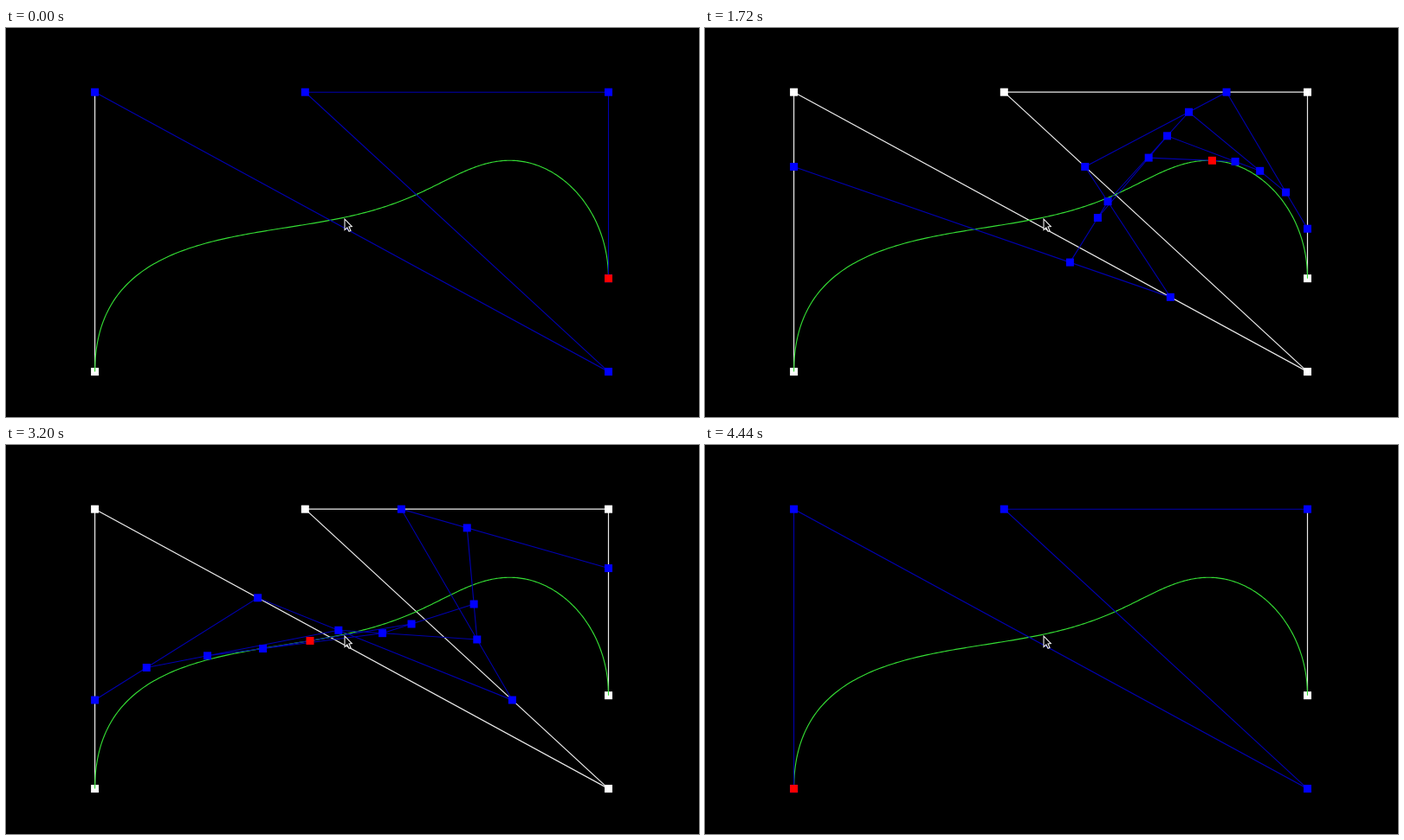
These frames come from a looping animation (800 px wide and 450 px high, 4.48 s). An HTML page with a canvas:

```html
<!DOCTYPE html>
<html lang="en">
<head>
<meta charset="utf-8">
<title>Bezier curve construction</title>
<style>
html, body { margin: 0; width: 100%; height: 100%; overflow: hidden; background: #000; }
canvas { display: block; }
</style>
</head>
<body>
<canvas id="stage" width="800" height="450"></canvas>
<script>
const ctx = document.getElementById('stage').getContext('2d');
const LOOP = 4480, STEP = 40;

const left = 102.6, right = 695.5, top_ = 74.2, bottom = 397.6;
const control = [
  [right, 289.7], [right, top_], [345.3, top_],
  [right, bottom], [left, top_], [left, bottom]
];

// Rest, then steady travel that speeds up slightly on the way, then rest
function paramAt(ms) {
  const since = t => Math.max(0, ms - t) / 1000;
  return Math.min(1, 0.2636 * since(708) + 0.024 * since(2120));
}

// One de Casteljau step
function reduce(pts, u) {
  return pts.slice(1).map(([x, y], i) => [
    pts[i][0] + (x - pts[i][0]) * u,
    pts[i][1] + (y - pts[i][1]) * u
  ]);
}

// All levels of the construction, ending with the single curve point
function construct(u) {
  const levels = [];
  for (let pts = reduce(control, u); pts.length; pts = reduce(pts, u)) levels.push(pts);
  return levels;
}

const curve = Array.from({ length: 301 }, (_, i) => construct(i / 300).pop()[0]);

function trace(pts) {
  pts.forEach(([x, y], i) => i ? ctx.lineTo(x, y) : ctx.moveTo(x, y));
}

// Strokes all paths at once, so overlaps do not get heavier
function lines(paths, color, width) {
  ctx.beginPath();
  paths.forEach(trace);
  ctx.strokeStyle = color;
  ctx.lineWidth = width;
  ctx.stroke();
}

function squares(pts, color) {
  ctx.fillStyle = color;
  for (const [x, y] of pts) ctx.fillRect(x - 4.5, y - 4.5, 9, 9);
}

function pointer() {
  ctx.beginPath();
  trace([[391, 221], [391, 233.6], [393.8, 231], [396, 235.3],
         [398, 234.4], [396, 230], [399.3, 229.6]]);
  ctx.closePath();
  ctx.fillStyle = '#000';
  ctx.fill();
  ctx.strokeStyle = '#f0f0f0';
  ctx.lineWidth = 1.1;
  ctx.stroke();
}

function draw(u) {
  ctx.fillStyle = '#000';
  ctx.fillRect(0, 0, 800, 450);

  const levels = construct(u);
  const dot = levels.pop();

  // At either end the first level hides all but one side of the frame
  const covered = u === 0 || u === 1;
  const side = u === 0 ? control.slice(-2) : control.slice(0, 2);
  lines([covered ? side : control], '#ebebeb', 1.2);
  squares(covered ? [u === 0 ? side[1] : side[0]] : control, '#fff');

  lines([curve], '#34dc34', 1.15);
  lines(levels, '#0000b0', 1.1);
  levels.forEach(pts => squares(covered ? [] : pts, '#00f'));
  if (covered) squares(levels[0], '#00f');
  squares(dot, '#f00');
  pointer();
}

const start = performance.now();
function tick() {
  const ms = Math.max(0, performance.now() - start) % LOOP;
  draw(paramAt(Math.floor(ms / STEP) * STEP));
  requestAnimationFrame(tick);
}
tick();
</script>
</body>
</html>
```
